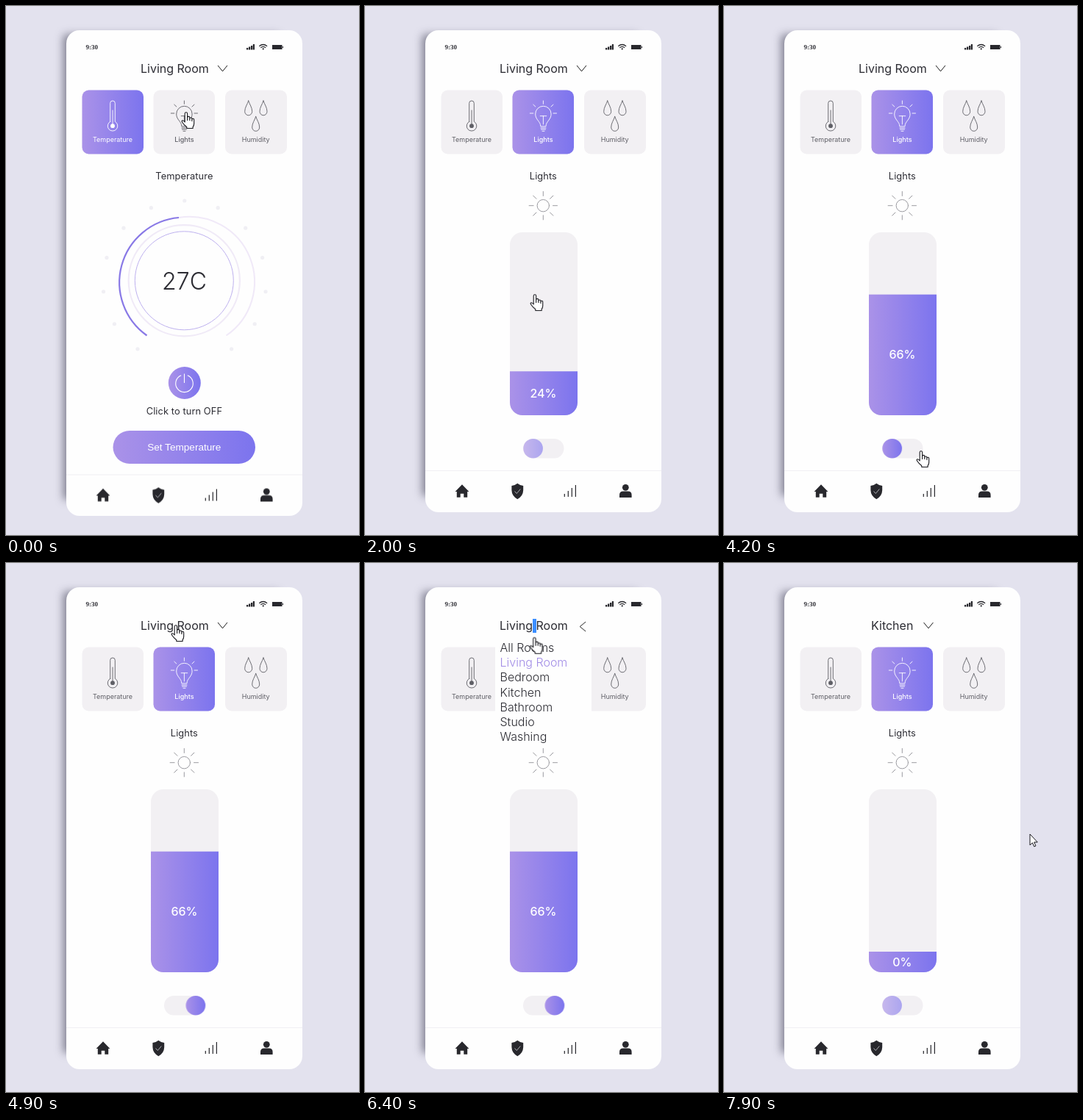
Recreate the animation shown at these times as an HTML page. Size 480x720 px, loop 8 s.

```html
<!DOCTYPE html>
<html lang="en">
<head>
<meta charset="utf-8">
<title>Smart home panel</title>
<style>
html, body { margin: 0; width: 100%; height: 100%; overflow: hidden; background: #e3e2ee; }
svg { position: absolute; left: 0; top: 0; width: 480px; height: 720px; font-family: Inter, "Open Sans", sans-serif; }
.phone {
  position: absolute; left: 82px; top: 33px; width: 321px; height: 656px;
  border-radius: 18px; background: #fefefe;
  box-shadow: -18px -8px 12px -14px rgba(60, 60, 80, .6);
}
text { fill: #2c2c33; }
.mid { text-anchor: middle; }
.head { font-size: 12.8px; letter-spacing: .1px; }
.title { font-size: 16px; }
.list { font-size: 16px; font-weight: 300; }
.label { font-size: 9px; fill: currentColor; }
.line { fill: none; stroke: currentColor; stroke-width: .9; stroke-linecap: round; stroke-linejoin: round; }
.grad { fill: url(#violet); }
.soft { fill: #f2f0f3; }
.dark { fill: #28282d; }
.card { color: #5f5f66; }
.spin { transform-box: fill-box; transform-origin: center; }

.phone, .anim { animation: 8s linear infinite; }
.phone { animation-name: shrink; }
.early { animation-name: early; }
.late { animation-name: late; }
.fromWhite { animation-name: fromWhite; }
.toWhite { animation-name: toWhite; }
.nav { animation-name: nav; }
.knob { animation-name: knob; }
.living { animation-name: living; }
.kitchen { animation-name: kitchen; }
.open { animation-name: open; }
.mark { animation-name: mark; }
.spin { animation-name: spin; }
.over1 { animation-name: over1; }
.over2 { animation-name: over2; }
.over3 { animation-name: over3; }
.cursor { animation-name: move; }
.hand { animation-name: hand; animation-timing-function: step-end; }
.arrow { animation-name: arrow; animation-timing-function: step-end; }

@keyframes shrink { 0%, 2.5% { height: 661px } 4%, 100% { height: 656px } }
@keyframes nav { 0%, 2.5% { transform: translateY(5.5px) } 4%, 100% { transform: none } }
@keyframes early { 0%, 2.5% { opacity: 1 } 4%, 100% { opacity: 0 } }
@keyframes late { 0%, 2.5% { opacity: 0 } 4%, 100% { opacity: 1 } }
@keyframes fromWhite { 0%, 2.5% { color: #fff } 4%, 100% { color: #5f5f66 } }
@keyframes toWhite { 0%, 2.5% { color: #5f5f66 } 4%, 100% { color: #fff } }
@keyframes knob {
  0%, 51.2% { transform: none; opacity: .6 }
  52.5% { transform: none; opacity: 1 }
  56%, 91.8% { transform: translateX(29.3px); opacity: 1 }
  94%, 100% { transform: none; opacity: .6 }
}
@keyframes living { 0%, 91.8% { opacity: 1 } 91.9%, 100% { opacity: 0 } }
@keyframes kitchen { 0%, 91.8% { opacity: 0 } 91.9%, 100% { opacity: 1 } }
@keyframes open { 0%, 77.5% { opacity: 0 } 80%, 91.8% { opacity: 1 } 93.5%, 100% { opacity: 0 } }
@keyframes mark { 0%, 77.4% { opacity: 0 } 77.5%, 91.8% { opacity: 1 } 91.9%, 100% { opacity: 0 } }
@keyframes spin {
  0%, 77.5% { transform: none }
  80%, 91.8% { transform: translate(1.5px, 1.5px) rotate(90deg) }
  93.5%, 100% { transform: none }
}
@keyframes over1 { 0%, 81% { fill: #2c2c33 } 81.5%, 83% { fill: #a08be6 } 83.5%, 100% { fill: #2c2c33 } }
@keyframes over2 { 0%, 85% { fill: #2c2c33 } 85.5%, 87% { fill: #a08be6 } 87.5%, 100% { fill: #2c2c33 } }
@keyframes over3 { 0%, 87% { fill: #2c2c33 } 87.5%, 100% { fill: #a08be6 } }
@keyframes move {
  0%, 2.5% { transform: translate(245px, 145px) }
  7% { transform: translate(428px, 300px) }
  11.25% { transform: translate(305px, 515px) }
  14% { transform: translate(250px, 536px) }
  20% { transform: translate(243px, 511px) }
  22.5% { transform: translate(238px, 450px) }
  25% { transform: translate(231px, 393px) }
  28% { transform: translate(233px, 400px) }
  33.75% { transform: translate(243px, 511px) }
  37.5% { transform: translate(243px, 456px) }
  43%, 45.5% { transform: translate(243px, 406px) }
  49% { transform: translate(290px, 540px) }
  52.5%, 55% { transform: translate(268px, 606px) }
  57.5% { transform: translate(322px, 626px) }
  61.25%, 77.5% { transform: translate(231px, 85px) }
  82% { transform: translate(230px, 115px) }
  86% { transform: translate(225px, 155px) }
  90%, 91.8% { transform: translate(222px, 180px) }
  96.25% { transform: translate(413px, 335px) }
  98.75%, 100% { transform: translate(416px, 369px) }
}
@keyframes hand {
  0% { opacity: 1 } 4% { opacity: 0 } 12.5% { opacity: 1 } 47% { opacity: 0 }
  51.5% { opacity: 1 } 56% { opacity: 0 } 60.8% { opacity: 1 } 92.8%, 100% { opacity: 0 }
}
@keyframes arrow {
  0% { opacity: 0 } 4% { opacity: 1 } 12.5% { opacity: 0 } 47% { opacity: 1 }
  51.5% { opacity: 0 } 56% { opacity: 1 } 60.8% { opacity: 0 } 92.8%, 100% { opacity: 1 }
}
</style>
</head>
<body>
<div class="phone"></div>
<svg viewBox="0 0 480 720">
  <defs>
    <linearGradient id="violet">
      <stop offset="0" stop-color="#aa92e8"/>
      <stop offset="1" stop-color="#7c74ee"/>
    </linearGradient>
    <clipPath id="tank"><rect x="197" y="308" width="92" height="249" rx="17"/></clipPath>
    <path id="drop" d="M0-10C1.5-5 5-1 5 4.5A5 5.3 0 0 1-5 4.5C-5-1-1.5-5 0-10Z"/>
  </defs>

  <!-- status bar -->
  <text x="108.5" y="59" font-family="Liberation Serif, serif" font-size="9" font-weight="700">9:30</text>
  <path class="dark" d="M327 57h2.3v2.5h-2.3zM330 55.5h2.3v4h-2.3zM333 54h2.3v5.5h-2.3zM335.8 52h2.2v7.5h-2.2zM362 53h13.5v6h-13.5zM376 55h1v2h-1z"/>
  <g fill="none" stroke="#28282d" stroke-width="1.3">
    <path d="M344.3 54.8Q349.7 50.2 355.1 54.8M346.3 56.8Q349.7 54 353.1 56.8"/>
    <circle cx="349.7" cy="58.4" r=".5"/>
  </g>

  <!-- title -->
  <g class="anim living">
    <rect class="anim mark" x="228" y="76" width="5" height="19" fill="#3b8eff"/>
    <text class="title" x="183" y="91">Living Room</text>
    <path class="line anim spin" d="M288.3 81.3l6.2 7.6 6.2-7.6"/>
  </g>
  <g class="anim kitchen">
    <text class="title" x="200" y="91">Kitchen</text>
    <path class="line" d="M271.8 81.3l6.2 7.6 6.2-7.6"/>
  </g>

  <!-- cards -->
  <g class="card anim fromWhite">
    <rect class="soft" x="103.5" y="114.5" width="83.5" height="87" rx="9"/>
    <rect class="grad anim early" x="103.5" y="114.5" width="83.5" height="87" rx="9"/>
    <path class="line" d="M141.7 157.3V132.3a3.3 3.3 0 0 1 6.6 0V157.3A6.8 6.8 0 1 1 141.7 157.3ZM145 142V161"/>
    <circle cx="145" cy="163.2" r="2.9" fill="currentColor"/>
    <text class="label mid" x="145" y="185">Temperature</text>
  </g>
  <g class="card anim toWhite">
    <rect class="soft" x="200.5" y="114.5" width="83.5" height="87" rx="9"/>
    <rect class="grad anim late" x="200.5" y="114.5" width="83.5" height="87" rx="9"/>
    <path class="line" d="M238.8 163.5C238.8 157 231.7 155 231.7 147A10.7 10.7 0 0 1 253.1 147C253.1 155 246 157 246 163.5ZM239 166h7M239.5 168h6M241 170.3h3M238.2 149.7h8.6M242.4 149.7V161M242.4 129v4.3M224.3 146h4.5M256 146h4.5M228.8 134.2l3 2.8M256 134.2l-3 2.8"/>
    <text class="label mid" x="242.4" y="185" font-weight="500">Lights</text>
  </g>
  <g class="card">
    <rect class="soft" x="298" y="114.5" width="84" height="87" rx="9"/>
    <g class="line">
      <use href="#drop" x="329.7" y="139"/>
      <use href="#drop" x="350" y="139"/>
      <use href="#drop" x="339.7" y="160.5"/>
    </g>
    <text class="label mid" x="339.7" y="185">Humidity</text>
  </g>

  <!-- temperature view -->
  <g class="anim early">
    <text class="head mid" x="242.4" y="236">Temperature</text>
    <g id="dots" fill="#f0eff4"></g>
    <g fill="none">
      <path d="M235 288A88.6 88.6 0 0 1 299.5 448.5" stroke="#f0e9f8" stroke-width="2"/>
      <path d="M191.5 448.5A88.6 88.6 0 0 1 235 288" stroke="#8979e6" stroke-width="2.2"/>
      <circle cx="242.3" cy="373.8" r="75.6" stroke="#f0eaf7" stroke-width="2.2"/>
      <circle cx="242.3" cy="373.8" r="67" stroke="#bdb0ee" stroke-width="1"/>
    </g>
    <text class="mid" x="242.5" y="386" font-size="32" font-weight="300">27C</text>
    <circle class="grad" cx="242.8" cy="513" r="22"/>
    <path d="M238.2 502.8A11.8 11.8 0 1 0 246.8 502.8M242.5 500.5V513" fill="none" stroke="#fff" stroke-width="1.1"/>
    <text class="head mid" x="242.4" y="556">Click to turn OFF</text>
    <rect class="grad" x="145.5" y="578" width="193.5" height="45" rx="22.5"/>
    <text class="mid" x="242.3" y="605" font-family="Liberation Sans, sans-serif" font-size="13.6" style="fill:#fff">Set Temperature</text>
  </g>

  <!-- lights view -->
  <g class="anim late">
    <text class="head mid" x="242.4" y="236">Lights</text>
    <g id="sun" class="line" color="#8f8f96"><circle cx="242.3" cy="271.7" r="8.2"/></g>
    <g clip-path="url(#tank)">
      <rect class="soft" x="197" y="308" width="92" height="249"/>
      <rect id="fill" class="grad" x="197" width="92" height="249"/>
    </g>
    <text id="percent" class="mid" x="242.4" font-size="16" font-weight="500" style="fill:#fff"></text>
    <rect class="soft" x="215" y="589" width="55.5" height="26.5" rx="13.2"/>
    <circle class="grad anim knob" cx="228.6" cy="602.2" r="13.3"/>
  </g>

  <!-- navigation -->
  <g class="anim nav">
    <path d="M82 632.5H403" stroke="#f0eff3"/>
    <path class="dark" d="M122.6 661L132 651.2l9.4 9.8h-2.2v7.8h-4.9v-5h-4.6v5h-4.9V661Z"/>
    <path class="dark" d="M207.3 649.8Q211 652.8 215.2 653V659Q215 667 207.3 671.2 199.6 667 199.4 659V653Q203.6 652.8 207.3 649.8Z"/>
    <path d="M203.5 660.5l2.8 3 5-6" fill="none" stroke="#b9b9c0" stroke-width=".9"/>
    <path d="M271.3 668v-4M276.3 668v-8M281.3 668v-12M286.4 668v-16" stroke="#28282d" stroke-width="1.2"/>
    <circle class="dark" cx="354.3" cy="655.3" r="4.4"/>
    <path class="dark" d="M346 669v-3.5q0-5 5-5h6.6q5 0 5 5v3.5Z"/>
  </g>

  <!-- room list -->
  <g class="anim open">
    <rect x="177" y="100" width="131" height="150" fill="#fefefe"/>
    <g id="rooms" class="list"></g>
  </g>

  <!-- pointer -->
  <g class="anim cursor" fill="#fff" stroke="#17171c" stroke-linejoin="round">
    <g class="anim hand" stroke-width="1.1">
      <path d="M-1.8 13V1.4a1.7 1.7 0 0 1 3.4 0V7a1.6 1.6 0 0 1 3.2 0V8a1.6 1.6 0 0 1 3.1.4V9.4a1.4 1.4 0 0 1 2.8.5V15q0 2.4-1.6 4.6V21.5H.8V19.8Q-3 16.8-5.3 13.2-6.6 11.2-5 10.7-3.6 10.5-1.8 13Z"/>
      <path d="M1.6 7v4M4.8 8v3M7.9 9.4V12" fill="none"/>
    </g>
    <path class="anim arrow" d="M0 0V15L3.4 11.8 5.8 17 8 16 5.7 11H10.3Z"/>
  </g>
</svg>
<script>
const LOOP = 8000;
const $ = id => document.getElementById(id);

function add(parent, name, attrs, text = '') {
  const el = document.createElementNS('http://www.w3.org/2000/svg', name);
  for (const key in attrs) el.setAttribute(key, attrs[key]);
  el.textContent = text;
  parent.append(el);
}

for (let i = -6; i <= 6; i++) {
  const a = i * 24.15 * Math.PI / 180;
  add($('dots'), 'circle', { cx: 242.8 + 111 * Math.sin(a), cy: 376 - 111 * Math.cos(a), r: 2.6 });
}

for (let i = 0; i < 8; i++) {
  add($('sun'), 'path', { d: 'M242.3 258.5v-6', transform: `rotate(${i * 45} 242.3 271.7)` });
}

const hover = { 'All Rooms': 'anim over1', 'Bedroom': 'anim over2', 'Kitchen': 'anim over3' };
['All Rooms', 'Living Room', 'Bedroom', 'Kitchen', 'Bathroom', 'Studio', 'Washing'].forEach((room, i) => {
  const attrs = { x: 183.5, y: 121 + i * 20.2, class: hover[room] || '' };
  if (room === 'Living Room') attrs.style = 'fill:#a08be6';
  add($('rooms'), 'text', attrs, room);
});

// Brightness over time: [ms, percent]
const levels = [[0, 0], [1120, 0], [1600, 24], [2700, 24], [3000, 46], [3440, 66], [7344, 66], [7345, 0], [LOOP, 0]];

function levelAt(t) {
  const i = levels.findIndex(([time]) => time > t);
  const [t0, a] = levels[i - 1], [t1, b] = levels[i];
  return a + (b - a) * (t - t0) / (t1 - t0);
}

let start;
function draw(now) {
  start ??= now;
  const level = levelAt((now - start) % LOOP);
  const height = Math.max(28, level * 2.49);
  $('fill').setAttribute('y', 557 - height);
  $('percent').setAttribute('y', 557 - height / 2 + 5.5);
  $('percent').textContent = Math.round(level) + '%';
  requestAnimationFrame(draw);
}
requestAnimationFrame(draw);
</script>
</body>
</html>
```
